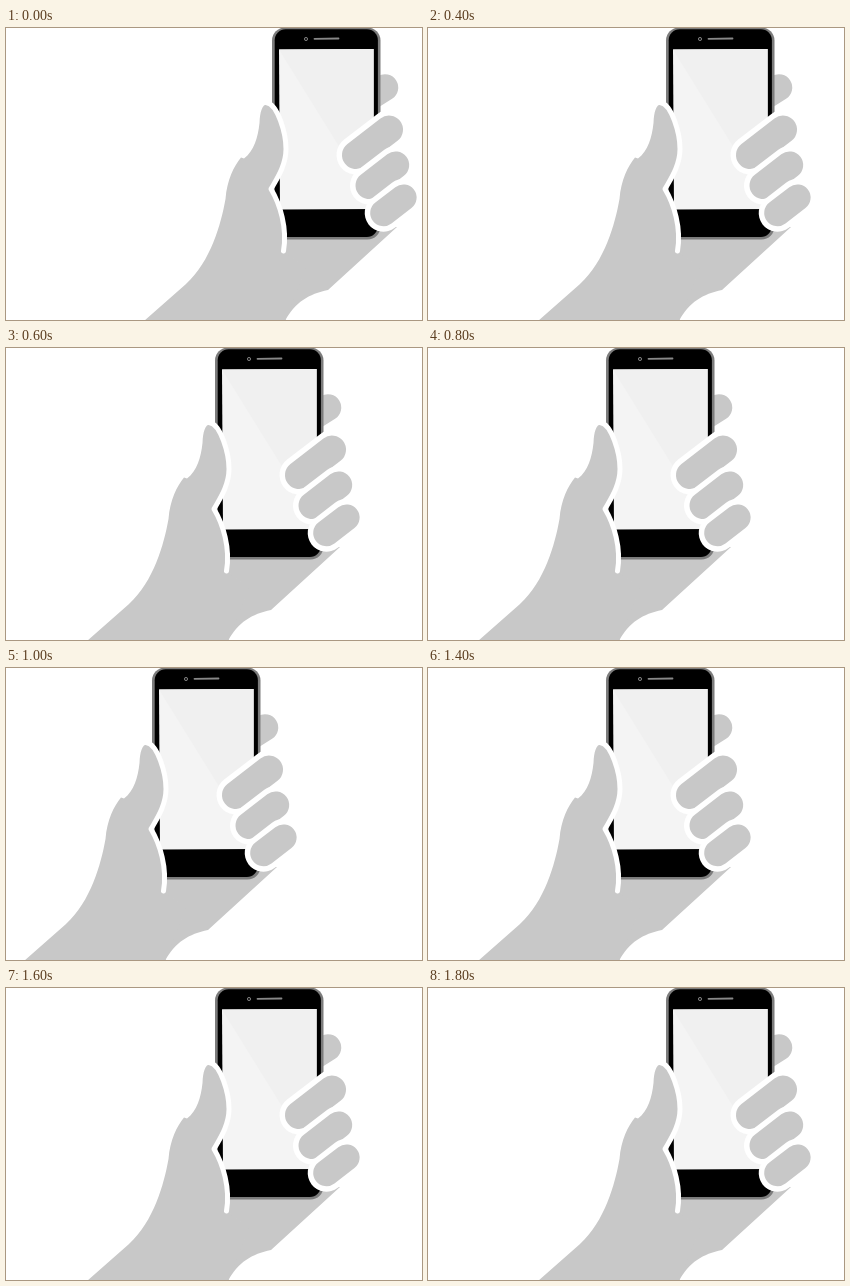
These frames come from a looping animation (416x292 px, 2 s). An HTML page:

```html
<!DOCTYPE html>
<html lang="en">
<head>
<meta charset="utf-8">
<title>Hand with phone</title>
<style>
  html, body { margin: 0; width: 100%; height: 100%; overflow: hidden; background: #fff; }
  svg { display: block; width: 416px; height: 292px; }
  .skin { fill: #c8c8c8; }
  .gap { fill: none; stroke: #fff; stroke-linecap: round; stroke-linejoin: round; }
  .finger { stroke: #c8c8c8; stroke-linecap: round; }
</style>
</head>
<body>
<svg viewBox="0 0 416 292">
  <g id="hand">
    <!-- palm and index finger behind the phone -->
    <path class="skin" d="M268 190 L391 199 L322 262 C303 266 289 274 279 293 L230 293 Z"/>
    <path class="finger" d="M364 69 L379 59.5" stroke-width="26.5"/>

    <!-- phone -->
    <rect x="266" y="-.5" width="108.5" height="212" rx="13" fill="#7c7c7c"/>
    <rect x="268.7" y="1.3" width="103.2" height="207.7" rx="11" fill="#000"/>
    <path d="M273 21.4 L367.6 20.9 V180.9 L274 181.5 Z" fill="#f4f4f4"/>
    <path d="M273 21.4 L367.6 20.9 V174 Z" fill="#f0f0f0"/>
    <circle cx="300" cy="11" r="1.6" fill="#111" stroke="#888" stroke-width=".9"/>
    <path d="M308.5 10.8 L332.5 10.5" stroke="#888" stroke-width="1.8" stroke-linecap="round"/>

    <!-- thumb and wrist -->
    <path class="skin" d="M138 293 L180 256 C205 233 215 196 219.5 171 C221 152 228 138 235 129.5
      L238 130.5 C248 123 252 109 253.5 95 C254 84 256 76.5 261 76.5
      C271 80 279.5 106 279.5 121 C279.5 138 270 152 265 161
      C274 176 281.5 200 277.5 223 L300 240 L279 293 Z"/>
    <path class="gap" stroke-width="5" d="M260 74.5 C272 76 280 106 280 121
      C280 138 270 152 265 161 C274 176 281.5 200 277.5 223"/>

    <g id="fingers"></g>
  </g>
</svg>
<script>
  const capsule = (name, d, width) =>
    `<path class="${name}" d="${d}" stroke-width="${width}"/>`;

  // Each finger sits lower and is shorter and thinner than the one above.
  function finger(i) {
    const x = 350 + 12.5 * i + 0.6 * i * i;
    const y = 127 + 32 * i - 1.5 * i * i;
    const reach = 33 - 6.5 * i;
    const width = 28 - 0.8 * i;
    const d = `M${x} ${y} l${reach} ${-0.77 * reach}`;
    return capsule("gap", d, width + 11) + capsule("finger", d, width);
  }
  document.getElementById("fingers").innerHTML = [0, 1, 2].map(finger).join("");

  // The hand jumps left and back, resting two slots at each end.
  const slots = 10, slotTime = 200;
  const shift = k => -Math.round(27.5 * k + 0.6 * k * k);
  const frames = Array.from({ length: slots + 1 }, (_, slot) => {
    const k = Math.max(0, 4.5 - Math.abs(slot - 5.5));
    return {
      offset: slot / slots,
      transform: `translateX(${shift(k)}px)`,
      easing: "step-end"
    };
  });
  document.getElementById("hand").animate(frames, {
    duration: slots * slotTime,
    iterations: Infinity
  });
</script>
</body>
</html>
```
